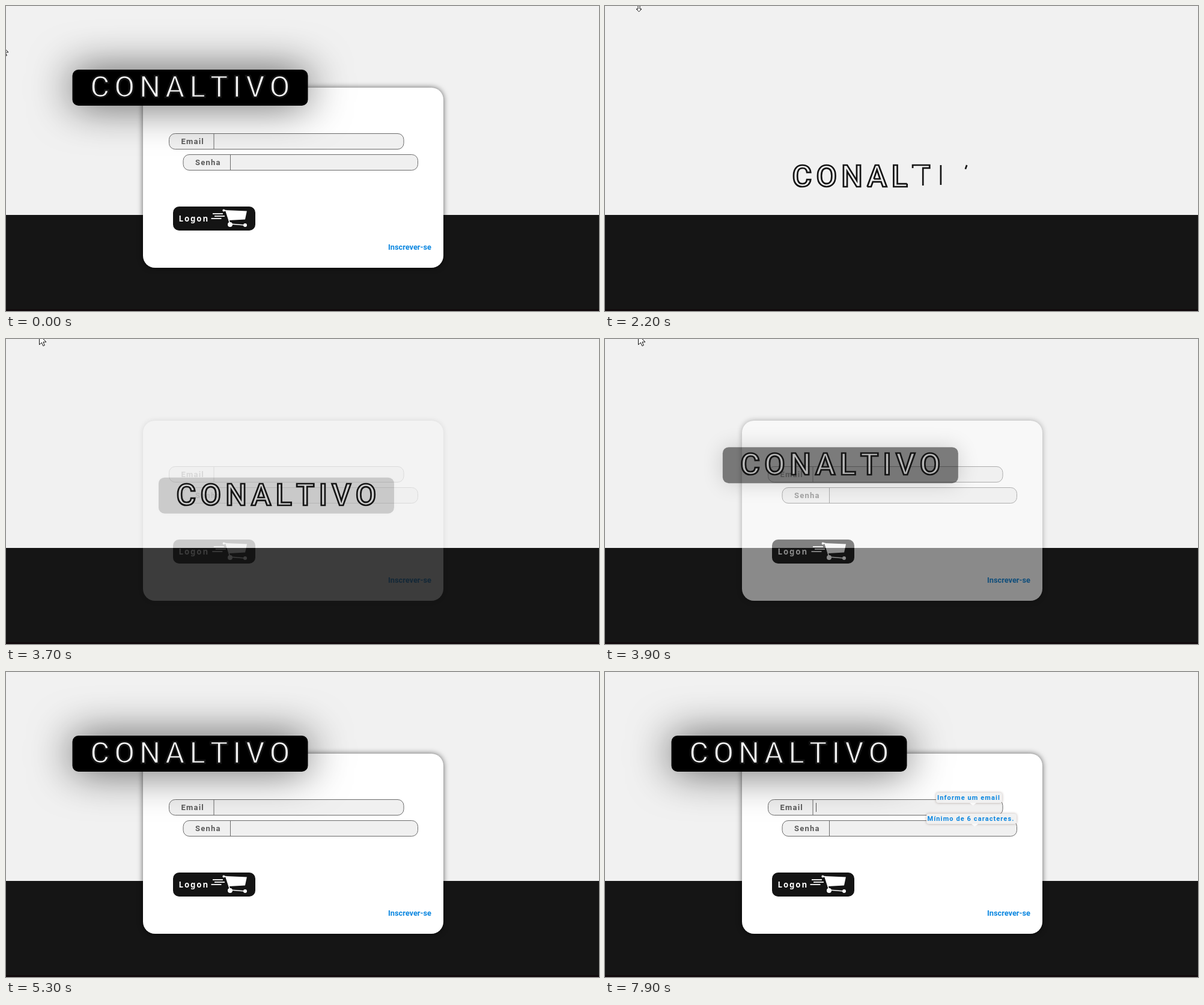
Write an HTML page that moves like this. It is 987 px wide and 508 px high and loops after 8 s.

```html
<!DOCTYPE html>
<html lang="pt">
<head>
<meta charset="utf-8">
<title>Login</title>
<style>
  html, body { margin: 0; width: 100%; height: 100%; overflow: hidden; background: #f1f1f1; }
  #stage { position: absolute; left: 0; top: 0; width: 987px; height: 508px; overflow: hidden;
    background: linear-gradient(#f1f1f1 348px, #151515 348px, #151515 505px, #110a0c 505px); }
  #stage > *, #page > * { position: absolute; left: 0; top: 0; }
  #page { width: 987px; height: 508px; }
  #card { left: 228px; top: 136px; width: 500px; height: 300px; border-radius: 20px;
    background: #fff; box-shadow: 0 0 10px rgba(0, 0, 0, .6); }
  #title { width: 392px; height: 60px; border-radius: 10px; }
  svg { display: block; overflow: visible; }
  text { font-family: Roboto, sans-serif; font-weight: 700; white-space: pre; }
  #word { font-size: 50px; font-weight: 500; letter-spacing: 7.3px; font-kerning: none;
    stroke: #151515; stroke-width: 2.7; }
  .field { fill: #f0f0f0; stroke: #6b6b6b; }
  .label { font-size: 13px; letter-spacing: 1.2px; fill: #595959; }
  .tip rect { fill: #f1f1f1; filter: drop-shadow(0 0 2px rgba(90, 60, 50, .4)); }
  .tip path { fill: #fafafa; }
  .tip text { font-size: 11px; letter-spacing: 1.1px; fill: #0a86e0; }
  #cursor path { fill: #fff; stroke: #111; stroke-linejoin: round; }
</style>
</head>
<body>
<div id="stage">
  <div id="page">
    <div id="card"></div>
    <svg width="987" height="508">
      <rect class="field" x="271.5" y="212.5" width="390.5" height="26" rx="10"/>
      <path d="M346 212.5v26" stroke="#6b6b6b"/>
      <text class="label" x="291.5" y="230">Email</text>
      <rect class="field" x="295" y="247.5" width="390.5" height="26" rx="10"/>
      <path d="M373.5 247.5v26" stroke="#6b6b6b"/>
      <text class="label" x="315" y="265">Senha</text>
      <path id="caret" d="M351.5 218v15" stroke="#555"/>

      <rect id="button" x="278" y="334" width="137" height="40" rx="10"/>
      <text x="287.5" y="359" fill="#fff" style="font:700 13.3px 'Noto Sans',sans-serif;letter-spacing:1.9px">Logon</text>
      <path id="speed" d="M345 346h17M348 350h17M342.500 354h17" stroke="#e4e4e4" stroke-width="2.2"/>
      <g id="cart" fill="#fff">
        <path d="M365 340L401 341.500L398 355.500L371 357z"/>
        <path d="M362 340.500H366L373 363L398 365" fill="none" stroke="#fff" stroke-width="1.6"/>
        <circle cx="362.500" cy="340.500" r="2"/>
        <circle cx="373" cy="364" r="4"/>
        <circle cx="398" cy="365" r="3"/>
      </g>
      <text x="708" y="406" text-anchor="end" font-size="12.8" fill="#0a86e0">Inscrever-se</text>

      <g id="tips">
        <g class="tip">
          <rect x="551" y="201" width="110" height="17" rx="4"/>
          <path d="M607 218h11l-5.500 4.500z"/>
          <text x="553" y="213">Informe um email</text>
        </g>
        <g class="tip">
          <rect x="535" y="236" width="150" height="17" rx="4"/>
          <path d="M610 253h11l-5.500 4.500z"/>
          <text x="536.500" y="248">Mínimo de 6 caracteres.</text>
        </g>
      </g>
    </svg>
  </div>
  <div id="title"><svg width="392" height="60"><text id="word" x="29.500" y="46"></text></svg></div>
  <svg width="987" height="508"><g id="cursor"><path/></g></svg>
</div>
<script>
const LOOP = 8000, RELOAD = 800, DRAW = 866, STEP = 170, REVEAL = 3260, REVEAL_MS = 1280;
const $ = id => document.getElementById(id);
const clamp = v => Math.max(0, Math.min(1, v));
const mix = (a, b, k) => a + (b - a) * k;
const inOut = u => u < .5 ? 4 * u ** 3 : 1 - 4 * (1 - u) ** 3;
const show = (el, on) => el.style.display = on ? '' : 'none';

const letters = [...'CONALTIVO'].map(ch => {
  const span = document.createElementNS('http://www.w3.org/2000/svg', 'tspan');
  span.textContent = ch;
  return $('word').appendChild(span);
});

const shapes = {
  arrow: 'M.5 .5V16.500L4.300 13L6.800 18.500L9.300 17.500L6.900 12H12z',
  resize: 'M-1.500 -6H1.500V5H4.500L0 9.500L-4.500 5H-1.500z',
  hand: 'M-2 1.500Q-.3 -.8 1.500 1.500V7Q3.300 5.500 4.700 7.500Q6.200 6.500 7.300 8.500Q9.500 7.800 9.800 10.500V14.500L7.500 18.500V21.500H-2V19L-7 12.500Q-7.200 9.800 -4.500 11L-2 13.500z',
  beam: 'M-3 -8H3M0 -8V8M-3 8H3'
};
// start, end, shape, from x y, to x y
const moves = [
  [0, 100, 'arrow', -8, 65, -8, 65],
  [1500, 1700, 'arrow', 15, 4, 30, 4],
  [1900, 2600, 'resize', 56.5, 0, 56.5, 0],
  [2600, 4450, 'arrow', 55, -7, 55, -7],
  [5450, 5750, 'arrow', 164, 39, 361, 346],
  [5750, 6650, 'hand', 361, 352, 361, 352],
  [6650, 6850, 'hand', 361, 352, 368, 350],
  [6850, 7050, 'hand', 368, 350, 368, 350],
  [7050, 7200, 'hand', 368, 350, 385, 334],
  [7200, 7400, 'arrow', 385, 334, 415, 240],
  [7400, 7800, 'beam', 427, 228, 427, 228]
];

function drawCursor(t) {
  const m = moves.find(([a, b]) => t >= a && t < b);
  show($('cursor'), m);
  if (!m) return;
  const [a, b, shape, x0, y0, x1, y1] = m, k = (t - a) / (b - a);
  $('cursor').firstChild.setAttribute('d', shapes[shape]);
  $('cursor').setAttribute('transform', `translate(${mix(x0, x1, k)} ${mix(y0, y1, k)})`);
}

function draw(t) {
  const p = t < RELOAD ? 1 : inOut(clamp((t - REVEAL) / REVEAL_MS));
  $('page').style.opacity = p;

  const title = $('title').style;
  title.transform = `translate(${mix(282, 110.5, p)}px, ${mix(255, 106, p)}px)`;
  title.background = `rgba(0,0,0,${p})`;
  title.boxShadow = `0 0 ${70 * p}px rgba(0,0,0,${.65 * p * p})`;
  $('word').style.fill = `rgba(245,245,245,${p})`;

  // each outline is traced at a growing pace, one letter after the other
  letters.forEach((el, i) => {
    const k = Math.max(0, (t - DRAW) / STEP - i), len = 9.6 * k * k;
    const whole = t < RELOAD || len > 300;
    el.style.strokeDasharray = whole ? 'none' : `${len} 1000`;
    el.style.strokeOpacity = whole || len > 0 ? 1 : 0;
  });

  const hover = clamp((t - 5750) / 150) * (1 - clamp((t - 7200) / 150));
  const rgb = [[20, 58], [20, 155], [20, 229]].map(([a, b]) => Math.round(mix(a, b, hover)));
  $('button').setAttribute('fill', `rgb(${rgb})`);
  const sway = -Math.cos(2 * Math.PI * t / 2650);
  $('speed').setAttribute('transform', `translate(${sway})`);
  $('cart').setAttribute('transform', `rotate(${.25 * sway} 385 365)`);

  show($('tips'), t >= 6200);
  show($('caret'), t >= 7600);
  drawCursor(t);
}

const start = performance.now();
function tick() {
  draw((performance.now() - start) % LOOP);
  requestAnimationFrame(tick);
}
tick();
</script>
</body>
</html>
```
